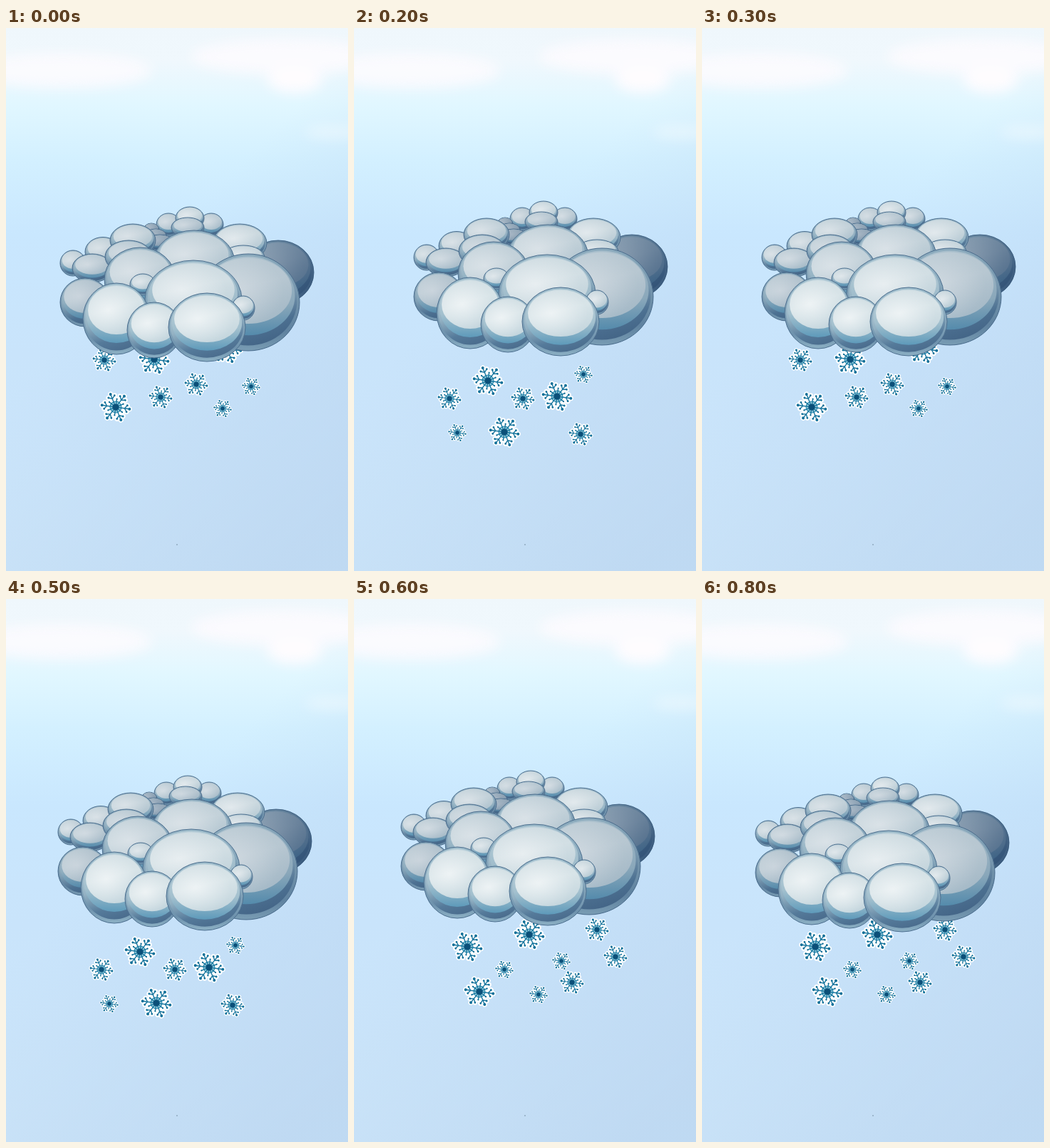
Recreate the animation shown at these times as an HTML page. Size 480 by 762 pixels, loop 0.9 s.

```html
<!DOCTYPE html>
<html lang="en">
<head>
<meta charset="utf-8">
<title>Snow cloud</title>
<style>
html, body { margin: 0; width: 100%; height: 100%; overflow: hidden; background: #cae5fb; }
svg { display: block; width: 100vw; height: 100vh; }
</style>
</head>
<body>
<svg viewBox="0 0 480 762" preserveAspectRatio="none">
  <defs>
    <linearGradient id="sky" x1="0" y1="0" x2="0" y2="1">
      <stop offset="0" stop-color="#eff7fc"/><stop offset=".06" stop-color="#f0f8fd"/>
      <stop offset=".14" stop-color="#e1f7ff"/><stop offset=".24" stop-color="#d3f0ff"/>
      <stop offset=".38" stop-color="#c9e7fe"/><stop offset=".6" stop-color="#c9e4fb"/>
      <stop offset="1" stop-color="#cde6fa"/>
    </linearGradient>
    <linearGradient id="dusk" gradientUnits="userSpaceOnUse" x1="160" y1="360" x2="480" y2="680">
      <stop offset="0" stop-color="#b9d4ef" stop-opacity="0"/>
      <stop offset="1" stop-color="#b9d4ef" stop-opacity=".7"/>
    </linearGradient>
    <linearGradient id="base" x1="0" y1="0" x2="0" y2="1">
      <stop offset="0" stop-color="#9dbccb"/><stop offset=".5" stop-color="#84a5ba"/>
      <stop offset=".8" stop-color="#6e92ad"/><stop offset="1" stop-color="#8cb0c4"/>
    </linearGradient>
    <linearGradient id="body" x1=".3" y1="0" x2=".6" y2="1">
      <stop offset="0" stop-color="#c2d5dd"/><stop offset=".5" stop-color="#93b1c3"/>
      <stop offset=".8" stop-color="#557a9a"/><stop offset="1" stop-color="#4a6c8d"/>
    </linearGradient>
    <linearGradient id="band" x1="0" y1="0" x2="0" y2="1">
      <stop offset="0" stop-color="#c0d4dd"/><stop offset=".6" stop-color="#a3c0ce"/>
      <stop offset="1" stop-color="#5e9aba"/>
    </linearGradient>
    <linearGradient id="face" x1=".3" y1="0" x2=".65" y2="1">
      <stop offset="0" stop-color="#d2dfe4"/><stop offset=".45" stop-color="#d8e4e8"/>
      <stop offset="1" stop-color="#c3d5dd"/>
    </linearGradient>
    <radialGradient id="shine" cx=".36" cy=".5" r=".55">
      <stop offset="0" stop-color="#fff" stop-opacity=".55"/>
      <stop offset="1" stop-color="#fff" stop-opacity="0"/>
    </radialGradient>
    <linearGradient id="shadow" x1=".1" y1=".2" x2=".95" y2=".7">
      <stop offset="0" stop-color="#2f5074" stop-opacity=".6"/>
      <stop offset="1" stop-color="#2b4a6f"/>
    </linearGradient>
    <filter id="soft" x="-40%" y="-60%" width="180%" height="220%"><feGaussianBlur stdDeviation="9"/></filter>
    <path id="crystal" fill="none" stroke-linecap="round"/>
    <g id="flake">
      <circle r="13.5" fill="#fff"/>
      <use href="#crystal" stroke="#fff" stroke-width="7"/>
      <use href="#crystal" stroke="#17759d" stroke-width="1.4"/>
      <circle r="8" fill="#1c86ab" fill-opacity=".45" stroke="#157ba3"/>
      <circle r="4.6" fill="#0b4f78"/>
      <g id="tips" fill="#107099"/>
    </g>
  </defs>
  <rect width="480" height="762" fill="url(#sky)"/>
  <rect width="480" height="762" fill="url(#dusk)"/>
  <g fill="#fefcfe" filter="url(#soft)">
    <ellipse cx="80" cy="60" rx="125" ry="24" opacity=".8"/>
    <ellipse cx="390" cy="40" rx="130" ry="24" opacity=".8"/>
    <ellipse cx="405" cy="72" rx="38" ry="18"/>
    <ellipse cx="460" cy="146" rx="42" ry="9" opacity=".4"/>
  </g>
  <circle cx="240" cy="725" r=".9" fill="#8ba5b9"/>
  <g id="snow"></g>
  <g id="cloud"></g>
</svg>
<script>
const NS = 'http://www.w3.org/2000/svg';
const STEP = 100, STEPS = 9;
const $ = id => document.getElementById(id);

function add(parent, tag, attrs = {}) {
  const node = document.createElementNS(NS, tag);
  for (const key in attrs) node.setAttribute(key, attrs[key]);
  return parent.appendChild(node);
}

// Crystal: six forked arms with short spokes between them
const polar = (r, deg) => {
  const a = deg * Math.PI / 180;
  return [r * Math.cos(a), r * Math.sin(a)];
};
function growCrystal() {
  let d = '';
  const dot = ([cx, cy], r) => add($('tips'), 'circle', { cx, cy, r });
  for (let a = 0; a < 360; a += 60) {
    const tip = polar(19.5, a), fork = polar(12.5, a), bud = polar(11.5, a + 30);
    d += `M0 0L${tip}M0 0L${bud}`;
    dot(tip, 2);
    dot(bud, 1.1);
    for (const side of [-16, 16]) {
      const end = polar(16.5, a + side);
      d += `M${fork}L${end}`;
      dot(end, 1.4);
    }
  }
  $('crystal').setAttribute('d', d);
}

// A flurry lists its flakes from large to small
function flurry(...spots) {
  const group = add($('snow'), 'g');
  spots.forEach(([x, y], i) => {
    const size = [1, .77, .6][Math.floor(i * 3 / spots.length)];
    add(group, 'use', { href: '#flake', transform: `translate(${x} ${y}) rotate(8) scale(${size})` });
  });
  return group;
}

// One glossy ball; shade darkens it
function puff(x, y, rx, ry, shade = 0) {
  const layer = (dy, sx, sy, fill, attrs) => add($('cloud'), 'ellipse',
    { cx: x, cy: y + dy * ry, rx: rx * sx, ry: ry * sy, fill, ...attrs });
  layer(0, 1, 1, 'url(#base)', { stroke: '#4d6f8f' });
  layer(-.03, .95, .92, 'url(#body)');
  layer(-.13, .91, .81, 'url(#band)');
  layer(-.24, .85, .68, 'url(#face)');
  layer(-.24, .85, .68, 'url(#shine)');
  if (shade) layer(0, 1, 1, 'url(#shadow)', { opacity: shade });
}

// A row of balls, each moved and grown by the same amount
function row(count, first, change, shade) {
  for (let i = 0; i < count; i++) puff(...first.map((v, k) => v + i * change[k]), shade);
}

function buildCloud() {
  for (const side of [-1, 1, 0]) {
    const off = Math.abs(side);
    puff(258 + 30 * side, 267 + 9 * off, 20 - 3 * off, 16, .08 + .1 * off);
  }
  row(3, [204, 283, 11, 9], [6, 9, 4.5, 1], .5);
  puff(255, 280, 23, 14, .22);
  row(3, [94, 330, 18, 18], [42, -16, 7, 2.5], .14);
  row(2, [121, 337, 28, 20], [51, -16, 5, 3], .2);
  puff(382, 343, 50, 45, .75);
  puff(328, 302, 38, 27, .08);
  puff(333, 322, 30, 17, .1);
  puff(111, 385, 35, 34, .25);
  puff(264, 329, 57, 45, .14);
  puff(188, 353, 50, 45, .14);
  puff(192, 360, 18, 15, .1);
  puff(340, 385, 72, 68, .22);
  puff(263, 381, 68, 55, .04);
  puff(155, 408, 47, 50);
  puff(333, 393, 16, 17, .08);
  puff(208, 424, 38, 39);
  puff(282, 420, 54, 48);
}

growCrystal();
buildCloud();
const flurries = [
  flurry([208, 465], [310, 450], [154, 532], [138, 466], [267, 500], [217, 518], [344, 503], [304, 534]),
  flurry([159, 488], [246, 471], [176, 551], [367, 502], [341, 464], [306, 538], [211, 520], [291, 508], [259, 555]),
  flurry([188, 495], [285, 517], [211, 567], [134, 520], [237, 520], [318, 570], [322, 486], [145, 568])
];

// The cloud swings right, then left, rising with each swing
const hump = u => u > 0 && u < 3.4 ? Math.sin(Math.PI * u / 3.4) : 0;
const swing = i => Math.round(9.3 * hump(i - .8) - 10.5 * hump(i - 4.7));

function draw(time) {
  const i = Math.floor(time / STEP) % STEPS;
  const x = swing(i);
  const shown = i < 6 ? i % 3 : 1;
  $('cloud').setAttribute('transform', `translate(${x} ${-Math.abs(x)})`);
  flurries.forEach((group, k) => group.setAttribute('display', k === shown ? 'inline' : 'none'));
}

const start = performance.now();
function tick() {
  draw(performance.now() - start);
  requestAnimationFrame(tick);
}
tick();
</script>
</body>
</html>
```
